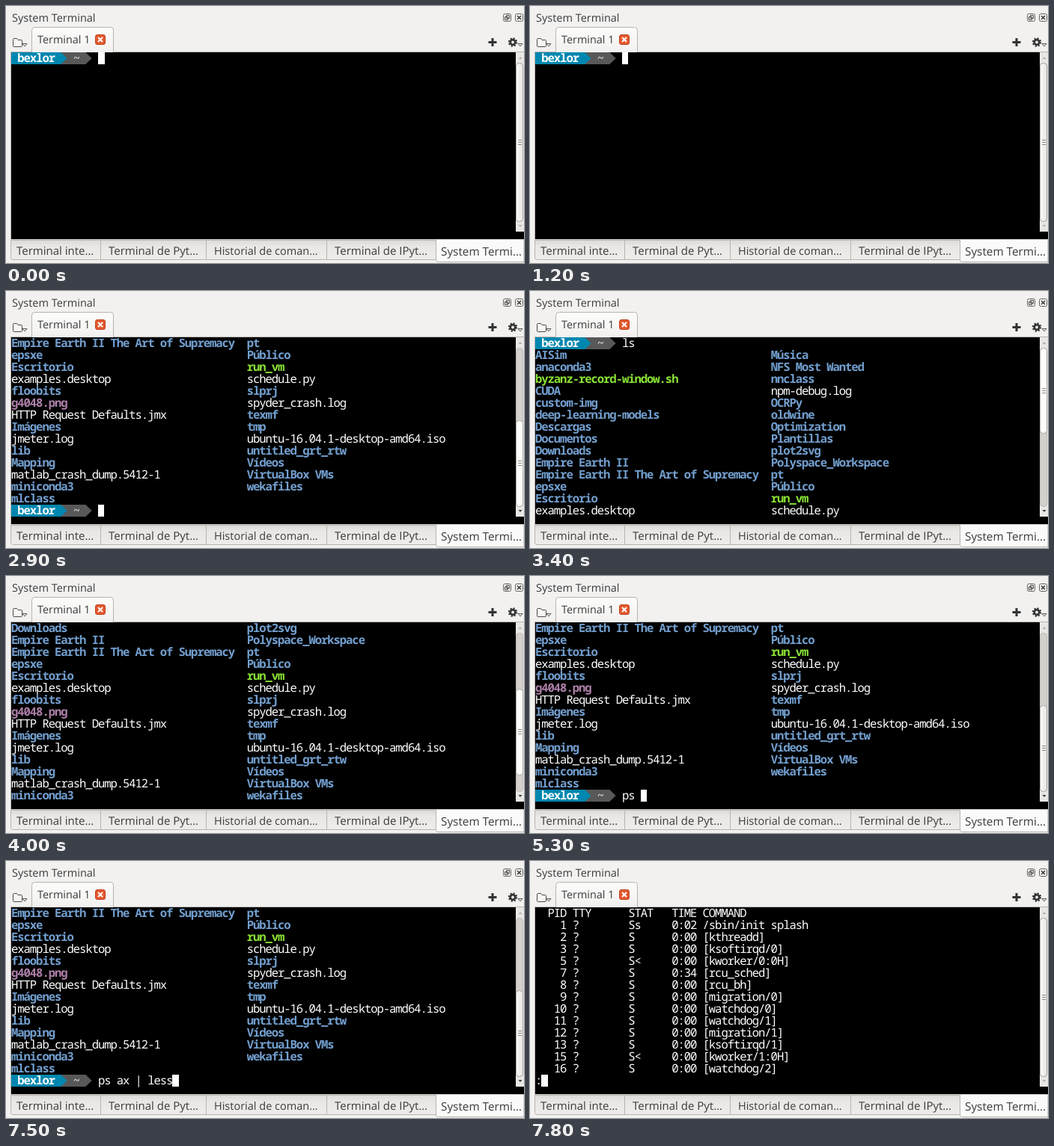
An HTML page for the animation above (8 s loop, 692 by 344 pixels).

```html
<!DOCTYPE html>
<html lang="en">
<head>
<meta charset="utf-8">
<title>System Terminal</title>
<style>
  html, body { margin: 0; width: 100%; height: 100%; overflow: hidden; background: #f2f1f0; }
  svg { display: block; position: absolute; left: 0; top: 0; }
  text { white-space: pre; text-rendering: geometricPrecision; }
  .ui { font-family: "Open Sans", "Noto Sans", sans-serif; fill: #3c3c3c; }
  .mono { font: 500 15.6px "Noto Sans Mono", "DejaVu Sans Mono", monospace; font-stretch: semi-condensed; fill: #fff; }
  .mono .b { font-weight: 700; }
  .crisp { shape-rendering: crispEdges; }
</style>
</head>
<body>
<svg width="692" height="344" viewBox="0 0 692 344">
  <defs>
    <linearGradient id="tab" x2="0" y2="1">
      <stop offset="0" stop-color="#fcfcfb"/><stop offset="1" stop-color="#f2f1f0"/>
    </linearGradient>
    <linearGradient id="low" x2="0" y2="1">
      <stop offset="0" stop-color="#dddbd9"/><stop offset=".3" stop-color="#e9e7e5"/><stop offset="1" stop-color="#efedeb"/>
    </linearGradient>
    <linearGradient id="thumb">
      <stop offset="0" stop-color="#fbfbfa"/><stop offset="1" stop-color="#e6e4e2"/>
    </linearGradient>
    <clipPath id="upper"><path d="M7 62H681V153H7z"/></clipPath>
    <clipPath id="lower"><path d="M7 153H681V311H7z"/></clipPath>
  </defs>

  <rect width="692" height="344" fill="#f2f1f0"/>
  <text class="ui" x="8" y="21" font-size="14.5">System Terminal</text>

  <!-- window buttons -->
  <g fill="none" stroke="#66635f">
    <rect x="664.5" y="10.5" width="10" height="10" rx="2"/>
    <path d="M668.5 12.5h4v4h-4zM666.5 14.5h4v4h-4z" stroke="#4a4845"/>
    <rect x="680.5" y="10.5" width="10" height="10" rx="2"/>
    <path d="M683 13l5 5M688 13l-5 5" stroke="#3c3c3c" stroke-width="1.6"/>
  </g>

  <!-- toolbar -->
  <path d="M9.5 53.5v-9q0-1 1-1h4l1.5 2h4.5q1 0 1 1v7q0 1-1 1h-10q-1 0-1-1z" fill="#f7f6f5" stroke="#4a4845"/>
  <path d="M22 50.5h6l-3 3.5z" fill="#f2f1f0" stroke="#4a4845" stroke-width=".9"/>
  <path d="M650 43v11M644.5 48.5h11" stroke="#333" stroke-width="3"/>
  <g fill="none" stroke="#333">
    <circle cx="677" cy="48.5" r="3.3" stroke-width="2.8"/>
    <circle cx="677" cy="48.5" r="5.2" stroke-width="2" stroke-dasharray="2.042"/>
  </g>
  <path d="M684 50.5h6l-3 3.5z" fill="#f2f1f0" stroke="#4a4845" stroke-width=".9"/>

  <!-- top tab -->
  <path class="crisp" d="M6 61.5H692M6.5 61V313" stroke="#b7b3ae"/>
  <path d="M34.5 62V32.5q0-4 4-4H139.5q4 0 4 4V62" fill="url(#tab)" stroke="#b7b3ae"/>
  <text class="ui" x="42" y="50" font-size="14.4">Terminal 1</text>
  <rect x="119.5" y="38.5" width="13" height="13" rx="2.5" fill="#e4582e" stroke="#bf4522"/>
  <path d="M123 42l6 6M129 42l-6 6" stroke="#fff" stroke-width="2"/>

  <rect class="crisp" x="7" y="62" width="685" height="250" fill="#000"/>
  <g id="screen" class="mono"></g>
  <g id="bar"></g>

  <!-- bottom tabs -->
  <path class="crisp" d="M6 312.5H692" stroke="#cfccc8"/>
  <path d="M6.5 313.5H574.5V339.5H9.5q-3 0-3-3z" fill="url(#low)" stroke="#b7b3ae"/>
  <path class="crisp" d="M126.5 314V339M267.5 314V339M428.5 314V339" stroke="#b7b3ae"/>
  <path d="M574.5 313V339.5q0 3 3 3H692V313" fill="#fbfafa" stroke="#b7b3ae"/>
  <g class="ui" font-size="15">
    <text x="14" y="333">Terminal inte…</text>
    <text x="137" y="333">Terminal de Pyt…</text>
    <text x="278" y="333" font-size="14.5">Historial de coman…</text>
    <text x="439" y="333">Terminal de IPyt…</text>
    <text x="581" y="334" font-size="15.3">System Termi…</text>
  </g>
</svg>

<script>
const LOOP = 8000, LEFT = 7, TOP = 62, CW = 8.28, ROW = 16, LAST = 14;
const USER = 'bexlor';
const COLORS = { d: '#729fcf', x: '#8ae234', i: '#ad7fa8', f: '#fff' };

// A suffix after "/" marks the kind: f file, x executable, i image; none is a folder.
const first = ['AISim', 'anaconda3', 'byzanz-record-window.sh/x', 'CUDA', 'custom-img',
  'deep-learning-models', 'Descargas', 'Documentos', 'Downloads', 'Empire Earth II',
  'Empire Earth II The Art of Supremacy', 'epsxe', 'Escritorio', 'examples.desktop/f',
  'floobits', 'g4048.png/i', 'HTTP Request Defaults.jmx/f', 'Imágenes', 'jmeter.log/f',
  'lib', 'Mapping', 'matlab_crash_dump.5412-1/f', 'miniconda3', 'mlclass'];
const second = ['Música', 'NFS Most Wanted', 'nnclass', 'npm-debug.log/f', 'OCRPy',
  'oldwine', 'Optimization', 'Plantillas', 'plot2svg', 'Polyspace_Workspace', 'pt',
  'Público', 'run_vm/x', 'schedule.py/f', 'slprj', 'spyder_crash.log/f', 'texmf', 'tmp',
  'ubuntu-16.04.1-desktop-amd64.iso/f', 'untitled_grt_rtw', 'Vídeos', 'VirtualBox VMs',
  'wekafiles'];
const processes = ['1 Ss 0:02 /sbin/init splash', '2 S 0:00 [kthreadd]',
  '3 S 0:00 [ksoftirqd/0]', '5 S< 0:00 [kworker/0:0H]', '7 S 0:34 [rcu_sched]',
  '8 S 0:00 [rcu_bh]', '9 S 0:00 [migration/0]', '10 S 0:00 [watchdog/0]',
  '11 S 0:00 [watchdog/1]', '12 S 0:00 [migration/1]', '13 S 0:00 [ksoftirqd/1]',
  '15 S< 0:00 [kworker/1:0H]', '16 S 0:00 [watchdog/2]'];

const screenEl = document.getElementById('screen');
const barEl = document.getElementById('bar');

const px = col => LEFT + col * CW;
const py = row => TOP + row * ROW;
const visible = row => row >= 0 && row <= LAST;

function text(row, col, str, color = '#fff', bold = false) {
  const safe = str.replace(/</g, '&lt;');
  return `<text x="${px(col)}" y="${py(row) + 13}" fill="${color}"${bold ? ' class="b"' : ''}>${safe}</text>`;
}

// Space the glyphs so that each one advances by exactly one terminal cell.
function fitCells() {
  screenEl.innerHTML = text(0, 0, 'm'.repeat(20));
  const advance = screenEl.firstChild.getComputedTextLength() / 20;
  screenEl.style.letterSpacing = CW - advance + 'px';
}

function cursor(row, col, extra = 0) {
  const x = Math.round(px(col)), w = Math.round(px(col + 1)) - x + extra;
  return `<rect class="crisp" x="${x}" y="${py(row)}" width="${w}" height="16" fill="#fff"/>`;
}

function arrow(row, from, to, color) {
  const y = py(row), a = px(from), b = px(to);
  return `<path d="M${a} ${y}H${b}l8.3 8-8.3 8H${a}z" fill="${color}"/>`;
}

function prompt(row, cmd) {
  return arrow(row, 8, 12, '#585858') + arrow(row, 0, 8, '#0087af') +
    text(row, 1, USER, '#fff', true) + text(row, 10, '~', '#d0d0d0', true) +
    text(row, 14, cmd);
}

function entry(row, col, item) {
  const [name, kind = 'd'] = item.split('/');
  return text(row, col, name, COLORS[kind], kind !== 'f');
}

function listing(top) {
  let out = visible(-top) ? prompt(-top, 'ls') : '';
  first.forEach((item, i) => {
    const row = i + 1 - top;
    if (!visible(row)) return;
    out += entry(row, 0, item);
    if (second[i]) out += entry(row, 38, second[i]);
  });
  return out;
}

const typed = (row, cmd, extra) => prompt(row, cmd) + cursor(row, 14 + cmd.length, extra);
const shell = cmd => listing(11) + typed(LAST, cmd);

function pager() {
  const rows = processes.map((p, i) => {
    const [pid, stat, time, ...cmd] = p.split(' ');
    const line = pid.padStart(5) + ' ?        ' + stat.padEnd(7) + time + ' ' + cmd.join(' ');
    return text(i + 1, 0, line);
  });
  return text(0, 0, '  PID TTY      STAT   TIME COMMAND') + rows.join('') +
    text(LAST, 0, ':') + cursor(LAST, 1);
}

// The list is painted from the bottom up while the old screen still shows above.
const halfPainted = () =>
  `<g clip-path="url(#upper)">${prompt(0, 'ls')}${cursor(1, 0)}</g>` +
  `<g clip-path="url(#lower)">${listing(11)}${cursor(LAST, 0)}</g>`;

const entered = () => listing(12) + prompt(LAST - 1, 'ps ax | less') + cursor(LAST, 0);

const FULL = [77, 288], END = [174, 288];
function scrollbar(thumb, hover) {
  const [a, b] = thumb;
  const mid = Math.round((a + b) / 2) - 1;
  const grips = [-3, 0, 3].map(d => `M684 ${mid + d + .5}h5`).join('');
  return `<path class="crisp" d="M681 62H692V302H681z" fill="#e9e7e5"/>
    <rect x="681.5" y="76.5" width="9" height="212" rx="4" fill="#d3d0cd" stroke="#bdb9b5"/>
    <path d="M684.5 71l2.5-3 2.5 3z" fill="#b5b1ad"/>
    <path d="M684.5 293l2.5 3 2.5-3z" fill="${thumb === FULL ? '#b5b1ad' : '#3c3c3c'}"/>
    <rect x="681.5" y="${a - .5}" width="9" height="${b - a + 1}" rx="4"
      fill="${hover ? '#fdfdfc' : 'url(#thumb)'}" stroke="#a9a5a0"/>
    <path class="crisp" d="${grips}" stroke="#8b8782"/>`;
}

// [start, screen, thumb, hover]
const steps = [
  [0, () => typed(0, '', 1), FULL],
  [1200, () => typed(0, ''), FULL],
  [1800, () => typed(0, 'l'), FULL],
  [1900, () => typed(0, 'ls'), FULL],
  [2100, halfPainted, END],
  [2200, () => listing(11) + cursor(LAST, 0), END],
  [2300, () => shell(''), END],
  [2900, () => shell(''), END, true],
  [3400, () => listing(0), [77, 190], true],
  [4000, () => listing(9), [152, 266], true],
  [4100, () => shell(''), END, true],
  [4600, () => shell(''), END],
  ...[[5000, 'p'], [5100, 'ps'], [5300, 'ps '], [5500, 'ps a'], [5600, 'ps ax'],
    [5800, 'ps ax '], [6000, 'ps ax |'], [6200, 'ps ax | '], [6500, 'ps ax | k'],
    [6800, 'ps ax | '], [7000, 'ps ax | l'], [7100, 'ps ax | le'], [7300, 'ps ax | les'],
    [7500, 'ps ax | less']].map(([at, cmd]) => [at, () => shell(cmd), END]),
  [7700, entered, END],
  [7800, pager, FULL]
];

const begin = performance.now();
let shown = -1;

function draw(now) {
  const t = Math.max(0, now - begin) % LOOP;
  let i = steps.length - 1;
  while (steps[i][0] > t) i--;
  if (i !== shown) {
    const [, paint, thumb, hover] = steps[shown = i];
    screenEl.innerHTML = paint();
    barEl.innerHTML = scrollbar(thumb, hover);
  }
  requestAnimationFrame(draw);
}
fitCells();
draw(begin);
</script>
</body>
</html>
```
